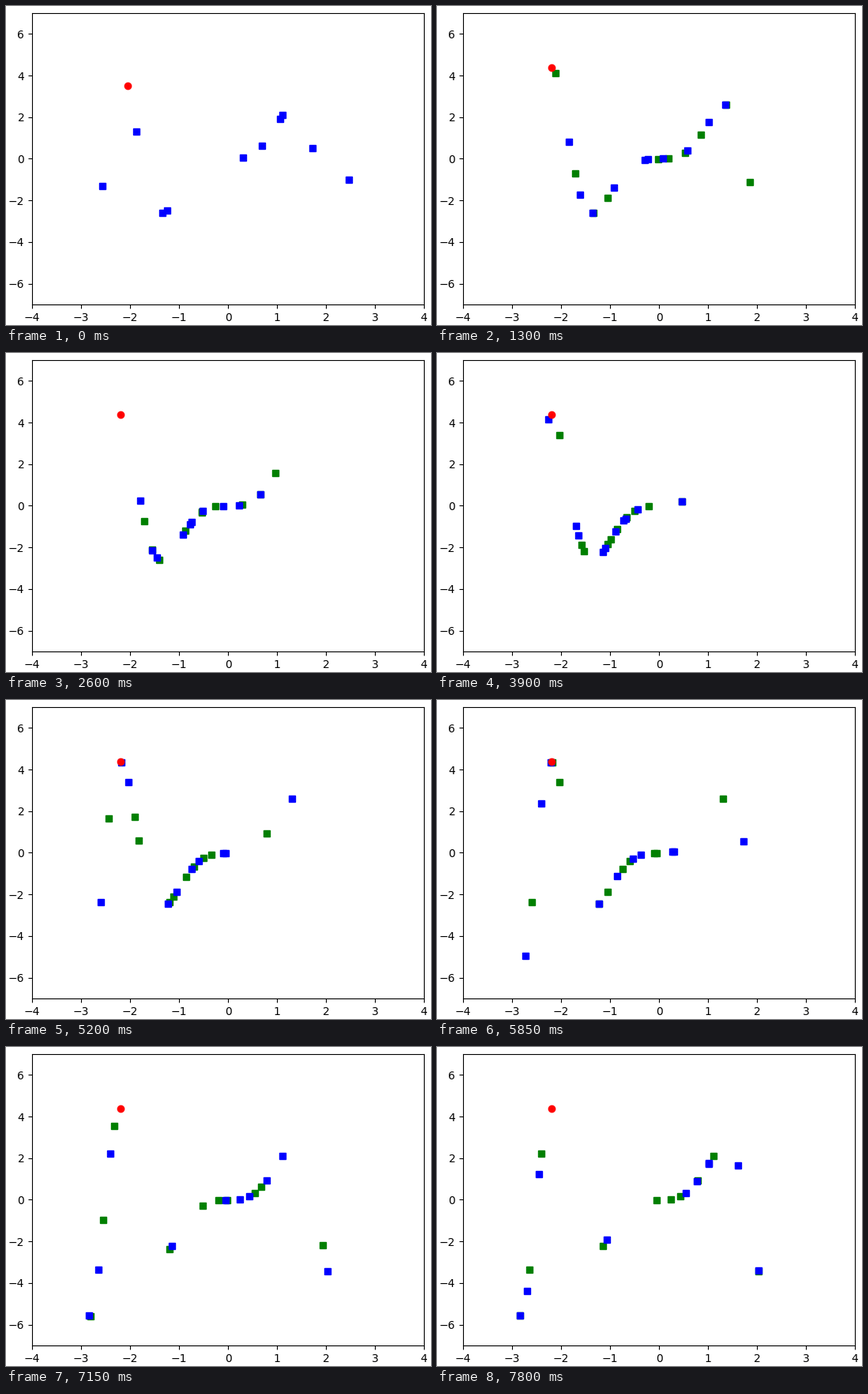
Animation, 538 px wide and 404 px high, one loop 8000 ms. Source, as a matplotlib script:

```python
import numpy as np
import matplotlib.pyplot as plt
from matplotlib.animation import FuncAnimation

W, H, DPI = 538, 404, 100
INTERVAL, LOOP, STEP = 50, 8000, 650  # ms
KEY_STEP = 3  # generations between key points

# Key points of each particle's path along x
PATHS = np.array([
    [-2.557, -1.709, -2.262, -2.725, -2.837],
    [-1.871, -1.549, -1.69, -2.401, -2.69],
    [-1.336, -1.403, -1.639, -2.21, -2.456],
    [-1.242, -0.87, -1.143, -1.222, -1.062],
    [0.306, -0.54, -1.093, -0.853, 0.555],
    [0.694, -0.53, -0.885, -0.53, 0.78],
    [1.065, -0.265, -0.72, -0.37, 1.016],
    [1.113, 0.29, -0.685, 0.27, 1.022],
    [1.729, 0.66, -0.435, 0.31, 1.613],
    [2.466, 0.97, 0.47, 1.727, 2.032],
])
SLOPES = np.gradient(PATHS, axis=1, edge_order=2)
FIRST_BEST, BEST = -2.044, -2.194


def fitness(x):
    return 2 * x * np.sin(x ** 2)


def swarm(gen):
    """Positions at a generation, by cubic Hermite between key points."""
    k = min(gen // KEY_STEP, PATHS.shape[1] - 2)
    u = gen / KEY_STEP - k
    ease = u * u * (3 - 2 * u)
    return (PATHS[:, k] * (1 - ease) + PATHS[:, k + 1] * ease
            + SLOPES[:, k] * u * (1 - u) ** 2
            - SLOPES[:, k + 1] * u * u * (1 - u))


def place(artist, xs):
    xs = np.array(xs, dtype=float)
    artist.set_data(xs, fitness(xs))


fig, ax = plt.subplots(figsize=(W / DPI, H / DPI), dpi=DPI)
fig.subplots_adjust(left=33 / W, right=529 / W, bottom=26 / H, top=395 / H)
ax.set_xlim(-4, 4)
ax.set_ylim(-7, 7)

previous, = ax.plot([], [], "s", color="green")
current, = ax.plot([], [], "s", color="blue")
best, = ax.plot([], [], "o", color="red")


def update(frame):
    gen = frame * INTERVAL // STEP
    place(previous, swarm(gen - 1) if gen else [])
    place(current, swarm(gen))
    place(best, [BEST if gen else FIRST_BEST])
    return previous, current, best


anim = FuncAnimation(fig, update, frames=LOOP // INTERVAL, interval=INTERVAL,
                     repeat=True, repeat_delay=0)
plt.show()
```
